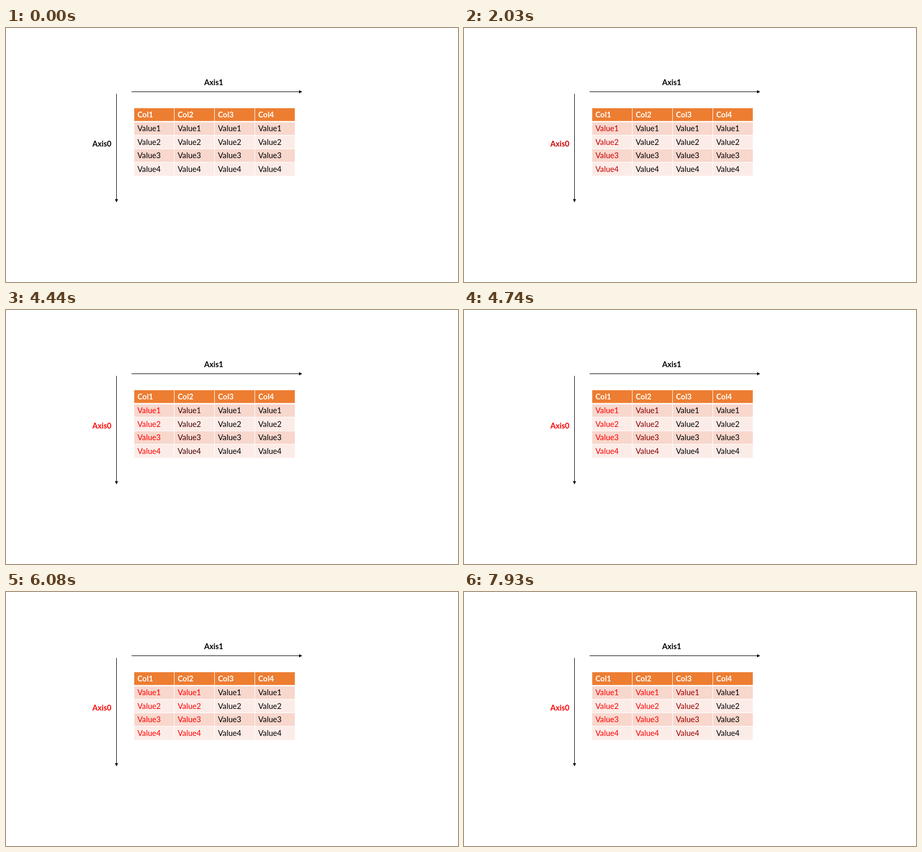
An HTML page for the animation above (7.99 s loop, 853 px wide and 480 px high).

```html
<!DOCTYPE html>
<html lang="en">
<head>
<meta charset="utf-8">
<title>Table axes</title>
<style>
html, body { margin: 0; width: 100%; height: 100%; overflow: hidden; background: #fff; }
svg { display: block; width: 853px; height: 480px; }
text { font: 14.7px Lato, Carlito, sans-serif; }
.bold { font-weight: 700; font-size: 14.4px; }
.head { fill: #fff; }
.first, .second, .third { animation: 7990ms infinite both; }
.first { animation-name: first; }
.second { animation-name: second; }
.third { animation-name: third; }
/* black to red over 1740 ms, easing out like a sine */
@keyframes first {
  0% { fill: #000; }
  13.392% { fill: #000; animation-timing-function: cubic-bezier(.39, .575, .565, 1); }
  35.169%, 100% { fill: #f00; }
}
@keyframes second {
  0% { fill: #000; }
  51.815% { fill: #000; animation-timing-function: cubic-bezier(.39, .575, .565, 1); }
  73.592%, 100% { fill: #f00; }
}
/* the loop ends partway through this change */
@keyframes third {
  0% { fill: #000; }
  90.238% { fill: #000; animation-timing-function: cubic-bezier(.333, .363, .667, .724); }
  100% { fill: rgb(165, 0, 0); }
}
</style>
</head>
<body>
<svg viewBox="0 0 853 480">
  <g stroke="#000" fill="none">
    <path d="M237 120.5H554M208.5 124.5V325"/>
  </g>
  <path d="M553 117.5L559 120.5L553 123.5ZM205.5 323.5L208.5 329.5L211.5 323.5Z"/>
  <text class="bold" x="374" y="108">Axis1</text>
  <text class="bold first" x="163" y="224">Axis0</text>
  <g id="table"></g>
</svg>
<script>
const table = document.getElementById('table');
const left = 242, top0 = 151.5, colW = 75.9, rowH = 25.6;
const groups = ['first', 'second', 'third', ''];

function add(tag, attrs, text = '') {
  const el = document.createElementNS('http://www.w3.org/2000/svg', tag);
  for (const key in attrs) el.setAttribute(key, attrs[key]);
  el.textContent = text;
  table.append(el);
}

for (let row = 0; row < 5; row++) {
  const fill = row === 0 ? '#ed7d31' : row % 2 ? '#f8d7cd' : '#fcece8';
  add('rect', { x: left, y: top0 + row * rowH, width: 303, height: rowH, fill });
}
for (let i = 1; i < 5; i++) {
  const y = i === 1 ? 177 : Math.floor(top0 + i * rowH) + 0.5;
  add('path', { d: `M${left} ${y}h303`, stroke: '#fff', 'stroke-width': i === 1 ? 2.6 : 1 });
}
for (let i = 1; i < 4; i++) {
  const x = Math.floor(left + i * colW) + 0.5;
  add('path', { d: `M${x} ${top0}v128`, stroke: '#fff' });
}
groups.forEach((group, col) => {
  const x = left + 6 + col * 76;
  add('text', { x, y: 169, class: 'bold head' }, `Col${col + 1}`);
  for (let row = 1; row < 5; row++) {
    add('text', { x, y: Math.round(169.4 + row * rowH), class: group }, `Value${row}`);
  }
});
</script>
</body>
</html>
```
